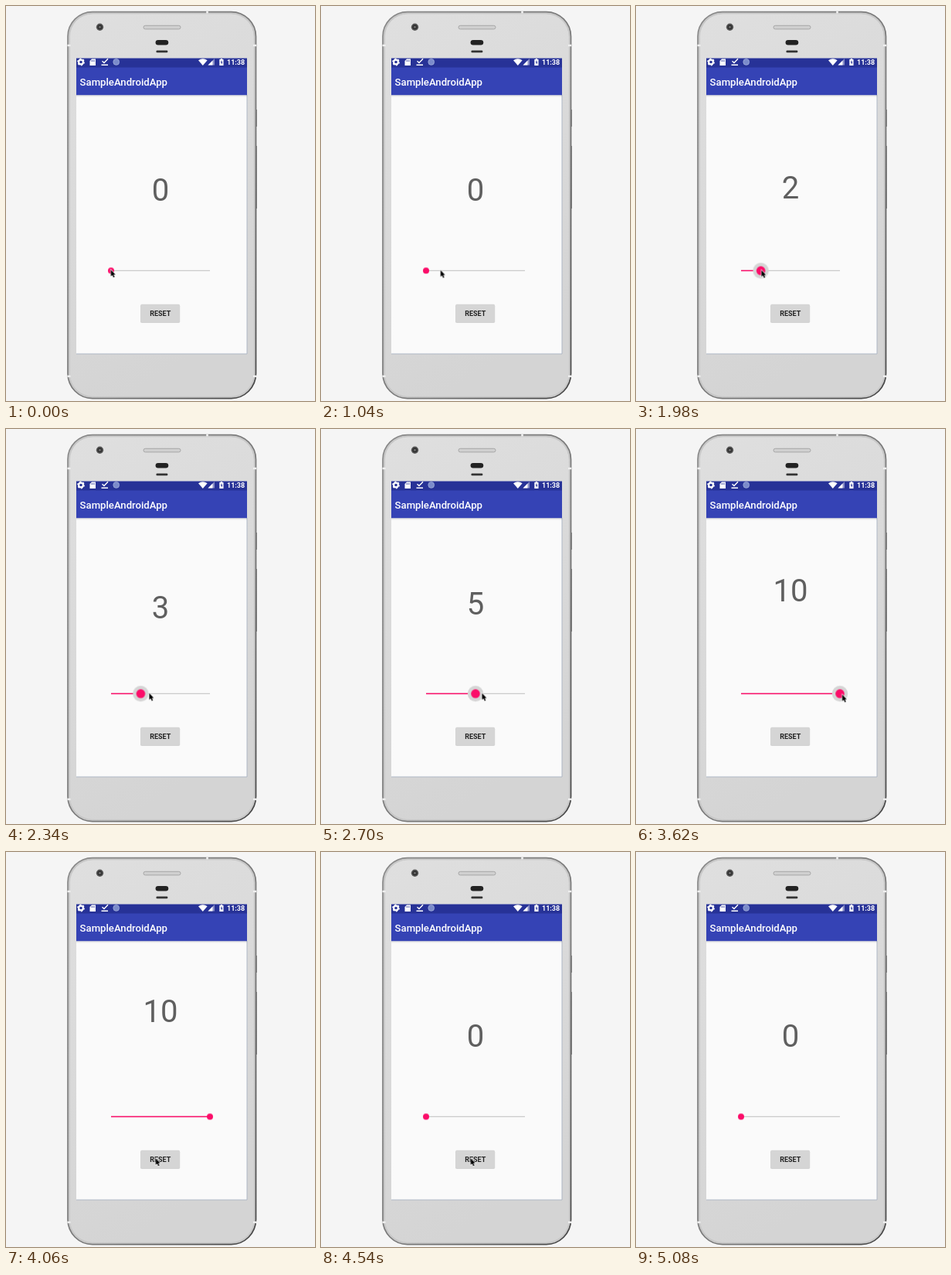
These frames come from a looping animation (400 by 511 pixels, 5100 ms). An HTML page:

```html
<!DOCTYPE html>
<html lang="en">
<head>
<meta charset="utf-8">
<title>Slider demo</title>
<style>
  @property --v { syntax: "<integer>"; inherits: true; initial-value: 0; }

  html, body { margin: 0; width: 100%; height: 100%; overflow: hidden; background: #f5f5f5; }
  #stage {
    position: relative; width: 400px; height: 511px; overflow: hidden;
    font-family: Roboto, sans-serif;
    animation: value 5.1s step-end infinite;
  }
  svg { position: absolute; left: 0; top: 0; }
  .cursor, .press, .halo, .dot, #count { animation: 5.1s linear infinite; }

  #count {
    position: absolute; left: 140px; top: 218.5px; width: 120px;
    font-size: 40px; line-height: 40px; text-align: center; color: #5f5f5f;
    animation-name: rise;
  }
  #count::after { counter-reset: n var(--v); content: counter(n); }

  .fill { transform: scaleX(calc(var(--v) / 10)); }
  .thumb { transform: translateX(calc(var(--v) * 12.8px)); }
  .halo { animation-name: halo; }
  .dot { animation-name: dot; }
  .press { animation-name: press; }
  .cursor { animation-name: move; }

  @keyframes value {
    0% { --v: 0; } 29% { --v: 1; } 37.3% { --v: 2; } 43.5% { --v: 3; }
    47.8% { --v: 4; } 51.4% { --v: 5; } 55.7% { --v: 6; } 59.2% { --v: 7; }
    62.4% { --v: 8; } 65.1% { --v: 9; } 67.8% { --v: 10; } 83.1%, 100% { --v: 0; }
  }
  @keyframes rise {
    0%, 29.4% { transform: translateY(0); animation-timing-function: ease-in-out; }
    34.3%, 38.4% { transform: translateY(-3.2px); }
    44.3% { transform: translateY(-6px); }
    52.9% { transform: translateY(-11.8px); }
    63.1% { transform: translateY(-19px); }
    68.6% { transform: translateY(-24px); animation-timing-function: ease-out; }
    74.5%, 83.1% { transform: translateY(-32px); animation-timing-function: ease-in-out; }
    89%, 100% { transform: translateY(0); }
  }
  @keyframes halo {
    0%, 29% { opacity: 0; }
    31%, 71% { opacity: 1; }
    74%, 100% { opacity: 0; }
  }
  @keyframes dot {
    0%, 29% { transform: scale(1); }
    31%, 71% { transform: scale(1.45); }
    73%, 100% { transform: scale(1); }
  }
  @keyframes press {
    0%, 81.5% { opacity: 0; }
    83%, 85% { opacity: .12; }
    89%, 100% { opacity: 0; }
  }
  @keyframes move {
    0%, 4.3% { transform: translate(135.5px, 341px); }
    20.4%, 27% { transform: translate(154.5px, 341.5px); }
    38.8% { transform: translate(162px, 341.5px); }
    52.9% { transform: translate(208px, 341.5px); }
    63.1% { transform: translate(240.5px, 342px); }
    68.4%, 70.6% { transform: translate(267px, 343px); animation-timing-function: ease-in-out; }
    78.4%, 90.6% { transform: translate(193.5px, 396px); animation-timing-function: ease-in; }
    98%, 100% { transform: translate(78px, 372px); }
  }
</style>
</head>
<body>
<div id="stage">
  <svg width="400" height="511" viewBox="0 0 400 511">
    <defs>
      <linearGradient id="rim" x2="1" y2="1">
        <stop offset="0" stop-color="#8a8a8a"/>
        <stop offset=".6" stop-color="#777"/>
        <stop offset="1" stop-color="#444"/>
      </linearGradient>
      <linearGradient id="body" x2=".3" y2="1">
        <stop offset="0" stop-color="#dfdfdf"/>
        <stop offset="1" stop-color="#d4d4d4"/>
      </linearGradient>
      <linearGradient id="bar" x2="0" y2="1">
        <stop offset="0" stop-color="#000" stop-opacity=".12"/>
        <stop offset="1" stop-color="#000" stop-opacity="0"/>
      </linearGradient>
      <clipPath id="screen"><path d="M91 67H312V450H91Z"/></clipPath>
    </defs>

    <!-- phone body -->
    <path d="M324 134V156M324 181V262" stroke="#777" stroke-width="1.6"/>
    <rect x="80" y="7.6" width="243.5" height="500" rx="32" fill="#c9c9c9" stroke="url(#rim)" stroke-width="1.7"/>
    <rect x="82.3" y="9.9" width="239" height="495.5" rx="30" fill="url(#body)" stroke="#c6c6c6"/>
    <path d="M79.5 51H83.5M320 51H324M79.5 479H83.5M320 479H324M260.5 6.5V9.5" stroke="#f0f0f0" stroke-width="2.6"/>
    <circle cx="121.5" cy="27.3" r="4.7" fill="#5c5c5c"/>
    <circle cx="121.5" cy="27.3" r="3.2" fill="#333"/>
    <circle cx="121.5" cy="27.3" r="1.2" fill="#777"/>
    <rect x="178" y="25.3" width="48" height="4.6" rx="2.3" fill="#d0d0d0" stroke="#a2a2a2" stroke-width=".9"/>
    <rect x="193.6" y="43.9" width="16.6" height="6.6" rx="3.3" fill="#222"/>
    <rect x="194.4" y="57.6" width="15" height="2.6" rx="1.3" fill="#333"/>

    <!-- app window -->
    <path d="M91 67.5H312V450H91Z" fill="#fafafa"/>
    <path d="M91 450H312M312 115V450" stroke="#a9b3c2" stroke-width=".9"/>
    <path d="M91 67.5H312V80H91Z" fill="#273297"/>
    <path d="M91 79.5H312V115.3H91Z" fill="#3543b5"/>
    <path d="M91 115.3H312V118H91Z" fill="url(#bar)"/>
    <text x="95.6" y="103" font-size="13.15" font-weight="500" fill="#fff">SampleAndroidApp</text>

    <!-- status bar -->
    <g fill="#fff">
      <circle cx="97" cy="72.5" r="2.9" fill="none" stroke="#fff" stroke-width="2.2"/>
      <circle cx="97" cy="72.5" r="4.1" fill="none" stroke="#fff" stroke-width="1.6" stroke-dasharray="1.9 2.394"/>
      <path d="M111 68.5H116V77H108.5V71Z"/>
      <path d="M110.7 70V72M112.5 70V72M114.3 70V72" stroke="#273297" stroke-width=".7"/>
      <path d="M124.5 71.3L127 73.6 132 68.3M123.5 76.3H132" fill="none" stroke="#fff" stroke-width="1.4"/>
      <circle cx="142.7" cy="72.4" r="3.9" fill="#7b8bcb" stroke="#a0acdb" stroke-width=".8"/>
      <path d="M249 70.3Q254.8 66 260.6 70.3L254.8 77Z"/>
      <path d="M270 68V76.5H261.5Z" opacity=".45"/>
      <path d="M267.5 70.5V76.5H261.5Z"/>
      <path d="M277.8 68H280V69H281.5V77H276.3V69H277.8Z"/>
      <path d="M279.4 70L277.7 73.3H278.8V76L280.4 72.6H279.4Z" fill="#273297"/>
      <text x="286" y="76" font-size="9" font-weight="700">11:38</text>
    </g>

    <!-- button -->
    <rect x="174" y="386.4" width="51.2" height="23.6" rx="1.8" opacity=".16"/>
    <rect x="174.3" y="385.8" width="50.6" height="23.2" rx="1.5" fill="#d5d5d5"/>
    <rect class="press" x="174.3" y="385.8" width="50.6" height="23.2" rx="1.5" opacity="0"/>
    <text x="199.8" y="400.6" font-size="9" font-weight="700" text-anchor="middle" fill="#222">RESET</text>

    <!-- slider -->
    <path d="M136 342.4H264" stroke="#cbcbcb" stroke-width="1.4"/>
    <g transform="translate(136 342.4)" fill="#fb0d69">
      <rect class="fill" y="-.75" width="128" height="1.5"/>
      <g class="thumb">
        <circle class="halo" r="10.2" fill="#d5d5d5"/>
        <circle class="dot" r="4"/>
      </g>
    </g>
  </svg>

  <div id="count"></div>

  <svg width="400" height="511" viewBox="0 0 400 511">
    <g clip-path="url(#screen)">
      <path class="cursor" d="M.3 .3V8.8L2.2 7 3.6 10.2 5.1 9.5 3.7 6.4H6.2Z" stroke="#fff" stroke-width="1.2" paint-order="stroke"/>
    </g>
  </svg>
</div>
</body>
</html>
```
